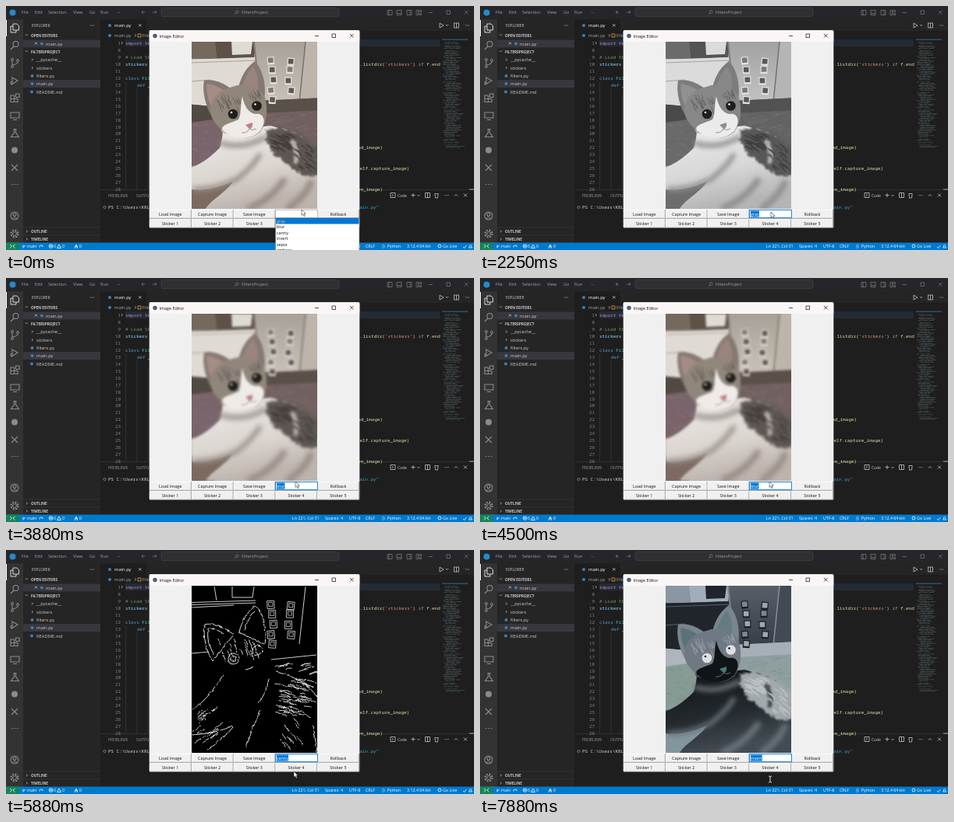
Recreate the animation shown at these times as an HTML page. Size 600 px wide and 314 px high, loop 8 s.

```html
<!DOCTYPE html>
<html lang="en">
<head>
<meta charset="utf-8">
<title>Image filter demo</title>
<style>
html, body { margin: 0; width: 100%; height: 100%; overflow: hidden; background: #1e1e1e; }
svg { display: block; width: 100vw; height: 100vh; }
text { font: 5.8px "Open Sans", sans-serif; fill: #ccc; white-space: pre; }
.menu { font-size: 5.6px; fill: #a2a2a2; }
.caps { font-size: 4.9px; }
.head { font-size: 4.7px; font-weight: 700; }
.code { font: 5.9px "Noto Sans Mono", monospace; fill: #d4d4d4; }
.num { fill: #858585; text-anchor: end; }
.right { text-anchor: end; }
.status { font-size: 5.3px; fill: #fff; }
.tk { font-size: 5.4px; fill: #111; }
.mid { text-anchor: middle; }
.line { fill: none; stroke: #c5c5c5; stroke-width: .8; }
.dim { stroke: #8b8b8b; stroke-width: 1.1; }
.faint { stroke: #777; }

#photo, #edges, #list, #mark, #field, .sel, #cursor, #arrow, #beam { animation: 8s step-end infinite; }
#photo { animation-name: filter; }
#edges { animation-name: edges; }
#list { animation-name: open; }
.sel { animation-name: selected; }
#mark { animation-name: hover; }
#field { animation-name: value; }
#arrow { animation-name: arrow; }
#beam { animation-name: beam; }
#cursor { animation-name: move; animation-timing-function: ease-in-out; }

@keyframes filter {
  0% { filter: none; }
  9.375% { filter: grayscale(1); }
  42.25% { filter: blur(1.6px); }
  73.5% { filter: none; }
  95.375%, 100% { filter: invert(1); }
}
@keyframes edges { 0% { opacity: 0; } 73.5% { opacity: 1; } 95.375%, 100% { opacity: 0; } }
@keyframes open {
  0%, 31.25%, 59.375%, 84.375% { opacity: 1; }
  9.375%, 42.25%, 73.5%, 95.375%, 100% { opacity: 0; }
}
@keyframes selected {
  0%, 31.25%, 59.375%, 84.375% { opacity: 0; }
  9.375%, 42.25%, 73.5%, 95.375%, 100% { opacity: 1; }
}
@keyframes hover {
  0%, 31.25%, 61%, 86% { transform: none; }
  37.5%, 59.375%, 66%, 88% { transform: translateY(7.5px); }
  68%, 84.375%, 90% { transform: translateY(15px); }
  92%, 100% { transform: translateY(22.5px); }
}
@keyframes value {
  0% { transform: none; }
  9.375% { transform: translateY(-20px); }
  42.25% { transform: translateY(-40px); }
  73.5% { transform: translateY(-60px); }
  95.375%, 100% { transform: translateY(-80px); }
}
@keyframes arrow { 0% { opacity: 1; } 95.375%, 100% { opacity: 0; } }
@keyframes beam { 0% { opacity: 0; } 95.375%, 100% { opacity: 1; } }
@keyframes move {
  0% { transform: translate(379px, 262px); }
  8%, 13% { transform: translate(376px, 277px); }
  20.5%, 31.5% { transform: translate(373px, 265px); }
  38%, 42% { transform: translate(372px, 287px); }
  48%, 59.5% { transform: translate(371px, 262px); }
  64% { transform: translate(371px, 278px); }
  69% { transform: translate(370px, 290px); }
  73.5% { transform: translate(369px, 285px); }
  81%, 84.5% { transform: translate(371px, 264px); }
  93%, 95.4% { transform: translate(372px, 298px); }
  98%, 100% { transform: translate(372px, 295px); }
}
</style>
</head>
<body>
<svg viewBox="0 0 600 314" preserveAspectRatio="none">
<defs>
  <clipPath id="frame"><rect x="238" y="46" width="161" height="215"/></clipPath>
  <clipPath id="box"><rect x="346" y="263" width="53" height="9"/></clipPath>
  <filter id="soft"><feGaussianBlur stdDeviation=".6"/></filter>
  <filter id="softer" x="-40%" y="-40%" width="180%" height="180%"><feGaussianBlur stdDeviation="3"/></filter>
  <filter id="fuzzy" x="-20%" y="-20%" width="140%" height="140%"><feTurbulence baseFrequency=".2" numOctaves="2" seed="2"/><feDisplacementMap in="SourceGraphic" scale="7" xChannelSelector="R" yChannelSelector="G"/><feGaussianBlur stdDeviation=".8"/></filter>
  <filter id="jag"><feTurbulence baseFrequency=".16" numOctaves="2" seed="4"/><feDisplacementMap in="SourceGraphic" scale="3" xChannelSelector="R" yChannelSelector="G"/></filter>
  <linearGradient id="door" x2="0" y2="1"><stop stop-color="#a59e94"/><stop offset="1" stop-color="#cac3ba"/></linearGradient>
  <linearGradient id="fur" x2=".3" y2="1"><stop stop-color="#efedea"/><stop offset=".6" stop-color="#dcd6d1"/><stop offset="1" stop-color="#bdb4ad"/></linearGradient>
  <path id="body" d="M278 163C300 172 328 148 346 156C374 160 396 176 399 190V261H256C262 250 282 240 291 226C270 235 250 238 238 236V208C252 202 266 192 276 180Z"/>
  <path id="patch" d="M332 158C352 150 382 160 399 184V214C386 222 370 214 362 203C349 197 338 186 332 172Z"/>
  <path id="skull" d="M262 135C262 118 275 107 290 104C305 98 325 103 332 118C336 132 335 150 326 162C314 173 292 172 278 160C268 152 263 145 262 135Z"/>
  <path id="earL" d="M254 96C251 110 256 130 264 142L291 108C278 98 265 93 254 96Z"/>
  <path id="earR" d="M319 71C308 79 301 91 298 105L331 121C334 100 329 81 319 71Z"/>
  <path id="muzzle" d="M303 116C305 128 311 138 320 139C330 137 335 148 326 161C314 173 291 173 278 160C274 153 288 151 298 146C302 139 300 129 303 116Z"/>
</defs>

<rect width="600" height="314" fill="#1e1e1e"/>
<rect width="600" height="17" fill="#242629"/>
<rect y="17" width="22" height="288" fill="#333"/>
<rect x="22" y="17" width="99" height="288" fill="#252526"/>
<path d="M22 43.500h99v10h-99zM22 95h99v10h-99z" fill="#37373d"/>
<rect x="121" y="17" width="479" height="15" fill="#252526"/>
<rect x="121" y="17" width="59" height="15" fill="#1e1e1e"/>
<rect x="199" y="2.500" width="228" height="11" rx="2.500" fill="#2d2f31" stroke="#47484b" stroke-width=".6"/>
<rect x="153" y="43" width="403" height="9" fill="#222b34"/>
<path d="M121 236.500H600M22 285H121M22 295H121M153.500 97.500V236M168 106.500V236M182.500 115V236" stroke="#3a3a3c" stroke-width=".7"/>
<path d="M594 236h6" stroke="#aaa"/>
<rect y="304.500" width="600" height="9.500" fill="#007acc"/>
<rect y="304.500" width="17" height="9.500" fill="#16825d"/>
<circle cx="8.500" cy="8.500" r="4" fill="#2489ca"/>

<path class="line faint" d="M178 8h-4l2-2m-2 2l2 2M188 8h5l-2-2m2 2l-2 2M298 7.500a1.800 1.800 0 1 0-3.600 0a1.800 1.800 0 1 0 3.600 0M295 9l-2 2M489 5.500h6v6h-6zM491 5.500v6M501 5.500h6v6h-6zM501 9.500h6M514 5.500h6v6h-6zM518 5.500v6M526 5.500h2.500v6H526zM530 5.500h2.500v2H530zM530 9.500h2.500v2H530zM542 8.500h5M565 6h4.500v4.500H565zM588 6l4.500 4.500m0-4.500l-4.500 4.500"/>
<path class="line" d="M556 22l5 3-5 3zM564 24l1.500 1.500 1.500-1.500M574.500 22h6v6h-6zM577.500 22v6M589 25h1m1 0h1m1 0h1M108 25h1m1 0h1m1 0h1M170 23l3.500 3.500m0-3.500l-3.500 3.500M37 46.500l3 3m0-3l-3 3"/>
<path class="line" d="M25 36.500l1.500 1.500 1.500-1.500M25 57.500l1.500 1.500 1.500-1.500M33 67.500l1.500 1.500-1.500 1.500M33 78l1.500 1.500-1.500 1.500M26 288.500l1.500 1.500-1.500 1.500M26 298.500l1.500 1.500-1.500 1.500M148 46l1.500 1.500-1.500 1.500M165 36.500l1.500 1.500-1.500 1.500"/>
<path class="line" d="M493 240.500h6v6h-6zM495 242l1.500 1.500-1.500 1.500M519.500 243.500h5M522 241v5M527.500 243l1.500 1.500 1.500-1.500M537.500 240.500h6v6h-6zM540.500 240.500v6M549.500 241.500h5M550 242l.5 5h3l.5-5M562.500 243.500h1m1 0h1m1 0h1M575 244.500l2-2 2 2M587 241.500l4 4m0-4l-4 4"/>
<rect y="18" width="1" height="21" fill="#fff"/>
<path class="line" d="M9 23h5l2.500 2.500V31H9zM9 26H6v8h7v-3" style="stroke:#fff"/>
<path class="line dim" d="M16 49a3.500 3.500 0 1 0-7 0a3.500 3.500 0 1 0 7 0M10 52l-4 4M8 70v7M15 71v1q0 3-7 4M8 92l7 4-7 4.500zM8 97a2 2 0 1 0 0 4M6 115h4.500v4.500H6zM6 119.500h4.500v4H6zM10.500 119.500H15v4h-4.500zM12.500 113H17v4.500h-4.500zM6 137h11v7H6zM9 146.500h5M9.500 158.500h4M10.500 159v4l-4 5.500h10l-4-5.500v-4M7 204l8 8M15 204l-8 8M7 229.500h1.500m2 0h1.500m2 0h1.500M16 270a5 5 0 1 0-10 0a5 5 0 1 0 10 0M13 268.500a2 2 0 1 0-4 0a2 2 0 1 0 4 0M8 274q3-3 6 0"/>
<g fill="none" stroke="#8b8b8b"><circle cx="8" cy="69" r="1.500"/><circle cx="8" cy="78" r="1.500"/><circle cx="15" cy="70" r="1.500"/><circle cx="11" cy="293" r="4.500" stroke-width="2" stroke-dasharray="2 1.530"/><circle cx="11" cy="293" r="2.500"/></g>
<circle cx="11" cy="185.500" r="4" fill="#8b8b8b"/>
<g fill="#3f7fb2"><circle cx="46" cy="48.500" r="2"/><circle cx="33.500" cy="90" r="2"/><circle cx="33.500" cy="100" r="2"/><circle cx="33" cy="110.500" r="2"/><circle cx="133" cy="25" r="2"/><circle cx="133" cy="38" r="2"/></g>
<path d="M169 36h4v4h-4z" fill="none" stroke="#ee9d28" stroke-width=".8"/>
<g fill="none" stroke="#fff" stroke-width=".8">
  <path d="M5 307l2.500 2-2.500 2.500M11.500 307l-2.500 2 2.500 2.500M22 307.500v4M24.500 308q0 2-2.500 2M43 310.500a2 2 0 0 1 4-1M47 308.500v1.500M56.500 308l2 2m0-2l-2 2M68 307l2.500 4.500h-5zM88 312l2-4.500 2 4.500M586 310l1.500 1.500 3-3.500M593.500 311h4q-1-1-1-2.500a1 1 0 0 0-2 0q0 1.500-1 2.500"/>
  <circle cx="57.500" cy="309" r="2.300"/><circle cx="90" cy="309" r="1"/><circle cx="556" cy="309" r="2"/>
</g>
<g id="minimap"></g>
<g id="ide"></g>

<rect x="183.700" y="31.200" width="269.600" height="254.300" rx="1.500" fill="#f0f0f0"/>
<rect x="183.700" y="31.200" width="269.600" height="14.800" rx="1.500" fill="#fbf6f6"/>
<circle cx="191" cy="38.500" r="2.700" fill="#46607c"/>
<path d="M396 38.500h5M418 36h4.500v4.500H418zM441 36l4.500 4.500m0-4.500l-4.500 4.500" fill="none" stroke="#222" stroke-width=".8"/>

<g clip-path="url(#frame)">
  <g id="photo">
    <rect x="230" y="40" width="177" height="230" fill="#bdb4aa"/>
    <g filter="url(#soft)">
      <path d="M230 40H267L270 68H230Z" fill="#75695c"/>
      <path d="M267 40H322L318 66 270 68Z" fill="#5e5248"/>
      <path d="M289 46H316L314 62 290 63Z" fill="#dedbd5"/>
      <path d="M230 69L320 66 326 134H230Z" fill="#dfdbd4"/>
      <path d="M238 73L320 70M238 97L262 95" stroke="#a8a097"/>
      <path d="M318 40H385L377 124 324 128Z" fill="url(#door)"/>
      <path d="M384 46L376 124" stroke="#7a7169" stroke-width="1.500"/>
      <path d="M318 46L326 124" stroke="#84796f" stroke-width="2"/>
      <path d="M325 122L407 118V200L325 190Z" fill="#70605f"/>
      <path d="M325 122L407 118V134L325 138Z" fill="#5a504a"/>
      <path d="M230 126L264 129 278 165 270 200 230 208Z" fill="#78646a"/>
      <path d="M230 126L264 129 266 146 230 151Z" fill="#524943"/>
      <path d="M230 230L294 222 262 270H230Z" fill="#7c6a60"/>
      <g id="rug"></g><g id="notes"></g>
      <use href="#body" fill="url(#fur)"/>
      <g fill="none" filter="url(#softer)">
        <path d="M274 176Q304 186 334 168M292 226Q318 206 326 190M240 236Q272 236 292 224" stroke="#968c86" stroke-width="6"/>
        <path d="M310 261Q340 249 358 222M392 224Q384 246 360 261" stroke="#968b84" stroke-width="8"/>
      </g>
      <g filter="url(#fuzzy)"><use href="#patch" fill="#5d5652"/>
        <path d="M364 172Q374 184 368 202" fill="none" stroke="#b9b1aa" stroke-width="5"/></g>
      <g id="tabby" fill="none" stroke="#38332f" stroke-width="1.100" opacity=".7"></g>
      <use href="#earL" fill="#857a71"/><use href="#earR" fill="#857a71"/>
      <path d="M257 100Q257 121 266 134L281 110Q269 101 257 100Z" fill="#a58c84"/>
      <path d="M317 78Q307 88 303 103L322 111Q326 92 317 78Z" fill="#9b847d"/>
      <use href="#skull" fill="#90867c"/>
      <g id="brow" fill="none" stroke="#5c534c" stroke-width=".9" opacity=".75"></g>
      <use href="#muzzle" fill="#eeebe8"/>
      <g fill="#211e1b" stroke="#8b877b" stroke-width="1.300"><circle cx="291" cy="139" r="7"/><circle cx="321.500" cy="128.500" r="7"/></g>
      <g fill="#fff"><circle cx="289" cy="137" r="1.300"/><circle cx="319.500" cy="126.500" r="1.300"/></g>
      <path d="M307 153L316 150Q317 157 312 158Z" fill="#c07f82"/>
      <path d="M312 158Q309 164 302 163M312 158Q316 161 321 158" fill="none" stroke="#8c7b76" stroke-width=".8"/>
    </g>
  </g>
  <g id="edges">
    <rect x="238" y="46" width="161" height="215"/>
    <g fill="none" stroke="#fff" stroke-width=".85" filter="url(#jag)">
      <use href="#earL"/><use href="#earR"/>
      <circle cx="291" cy="139" r="7"/><circle cx="291" cy="139" r="3.500"/><circle cx="321.500" cy="128.500" r="6.500"/>
      <path d="M259 100Q257 121 266 134M278 107Q269 100 259 100M318 78Q309 87 305 103M278 160Q266 182 238 206M290 225Q270 235 238 237M336 165Q333 183 322 197M326 205Q314 228 307 253M290 227Q280 240 257 257M393 225L398 260M307 153L316 150M346 156Q378 162 399 188"/>
    </g>
    <path d="M238 67.500L320 65M238 70.500L320 68M267 47L270 65M290 47V61H316L318 47M384 47L376 121M238 133L260 131M340 141L398 135M238 74L292 71" fill="none" stroke="#fff" stroke-width=".8"/>
    <g id="noteEdges"></g>
    <g id="furEdges" fill="none" stroke="#fff" stroke-width=".8" filter="url(#jag)"></g>
  </g>
</g>

<g id="buttons"></g>
<rect x="345.500" y="262.500" width="54" height="10" fill="#fff" stroke="#a5a5a5" stroke-width=".7"/>
<rect class="sel" x="345.500" y="262.500" width="54" height="10" fill="none" stroke="#0078d7" stroke-width=".8"/>
<g clip-path="url(#box)"><g id="field"></g></g>
<g id="list">
  <rect x="345.500" y="272.500" width="107.500" height="45" fill="#fff" stroke="#666" stroke-width=".6"/>
  <rect id="mark" x="346" y="273" width="106.500" height="7.500" fill="#0078d7"/>
  <g id="options"></g>
</g>
<g id="cursor">
  <path id="arrow" d="M0 0V7.300L1.700 5.800 3 8.700 4.300 8.100 3 5.300H5.300Z" fill="#fff" stroke="#222" stroke-width=".55"/>
  <path id="beam" d="M-2-4Q0-4 0-3Q0-4 2-4M0-3V3M-2 4Q0 4 0 3Q0 4 2 4" fill="none" stroke="#eee" stroke-width=".9"/>
</g>
</svg>
<script>
const $ = id => document.getElementById(id);
function add(parent, tag, attrs, content = '') {
  const el = document.createElementNS('http://www.w3.org/2000/svg', tag);
  for (const key in attrs) el.setAttribute(key, attrs[key]);
  el.textContent = content;
  return $(parent).appendChild(el);
}
function label(parent, cls, x, y, content, fill) {
  const el = add(parent, 'text', { class: cls, x, y: y + 2 }, content);
  if (fill) el.style.fill = fill;
}
const labels = (cls, rows) => rows.forEach(row => label('ide', cls, ...row));

let seed = 7;
const rand = (lo = 0, hi = 1) => {
  seed = (seed * 16807) % 2147483647;
  return lo + (hi - lo) * seed / 2147483647;
};

labels('menu', [[20, 8, 'File'], [37, 8, 'Edit'], [54, 8, 'Selection'], [86, 8, 'View'],
  [107, 8, 'Go'], [121, 8, 'Run'], [142, 7, '…'], [302, 8, 'FiltersProject']]);
labels('caps', [[33, 25, 'EXPLORER'], [131, 244, 'PROBLEMS', '#999'], [167, 244, 'OUTPUT', '#999'], [502, 243.5, 'Code']]);
labels('head', [[32, 38, 'OPEN EDITORS'], [32, 59, 'FILTERSPROJECT'], [32, 290, 'OUTLINE'], [32, 300, 'TIMELINE']]);
labels('', [[51, 48.5, 'main.py'], [39, 69, '__pycache__'], [39, 79.5, 'stickers'], [39, 90, 'filters.py'],
  [39, 100, 'main.py'], [39, 110.5, 'README.md'], [139, 25, 'main.py', '#fff'], [139, 38, 'main.py', '#a9a9a9'], [175, 38, 'FilterApp', '#a9a9a9']]);
labels('status', [[27, 309, 'main'], [61, 309, '0'], [72, 309, '0'], [94, 309, '0'], [367, 309, 'Ln 221, Col 31'],
  [409, 309, 'Spaces: 4'], [440, 309, 'UTF-8'], [461, 309, 'CRLF'], [482, 309, '{}  Python'],
  [514, 309, '3.12.4 64-bit'], [560, 309, 'Go Live']]);

const lineY = n => 93 + (n - 12) * 8.93;
label('ide', 'code num', 147, 47.7, '1');
for (let n = 8; n <= 28; n++) label('ide', 'code num', 147, lineY(n), n);
labels('code', [[153, 47.7, 'import tk', '#c586c0'], [153, lineY(9), '# Load St', '#6a9955'], [153, lineY(10), 'stickers ', '#9cdcfe'],
  [153, lineY(12), 'class', '#569cd6'], [174.2, lineY(12), 'Fil', '#4ec9b0'], [168, lineY(13), 'def', '#569cd6'], [182, lineY(13), '_', '#dcdcaa'],
  [454, lineY(10), '.listdir(', '#dcdcaa'], [485.9, lineY(10), "'stickers'", '#ce9178'], [521.3, lineY(10), ')'],
  [528.4, lineY(10), 'if', '#c586c0'], [539, lineY(10), 'f.end', '#dcdcaa'], [131, 259, 'PS C:\\Users\\KRLM']]);
labels('code right', [[483, lineY(22), 'load_image)', '#dcdcaa'], [517, lineY(25), 'self.capture_image)', '#dcdcaa'],
  [483, lineY(28), 'save_image)', '#dcdcaa'], [478, 259, 'main.py"', '#3a9fd0']]);
add('ide', 'circle', { cx: 126.5, cy: 259, r: 1.6, fill: 'none', stroke: '#777' });

const inks = ['#5f87a0', '#6f8794', '#8a7f70', '#5f8a80', '#7d8a94'];
add('minimap', 'rect', { x: 559, y: 42.7, width: 33, height: .9, fill: '#3074a0' });
for (let y = 45; y < 182; y += 1.5) {
  if (rand() < .12) continue;
  let x = 560 + Math.floor(rand(0, 4)) * 1.6;
  for (let i = 0; i < 3; i++) {
    const width = rand(2, 8);
    add('minimap', 'rect', { x, y, width, height: .7, fill: inks[Math.floor(rand(0, 5))], opacity: .5 });
    x += width + 1;
  }
}

// Pictures pinned to the door, in two loose columns.
for (let i = 0; i < 9; i++) {
  const x = 336 + (i % 2) * 23 + rand(-2, 3), y = 66 + Math.floor(i / 2) * 12 + rand(-1, 3);
  const shape = { x, y, width: 9, height: 10, transform: `rotate(${rand(-6, 6)} ${x} ${y})` };
  add('notes', 'rect', { ...shape, fill: '#e6e1da' });
  add('notes', 'rect', { ...shape, x: x + 1.2, y: y + 1.2, width: 6.6, height: 6.5, fill: i % 3 ? '#5d5853' : '#85776c' });
  add('noteEdges', 'rect', { ...shape, fill: 'none', stroke: '#fff', 'stroke-width': .7 });
  add('noteEdges', 'rect', { ...shape, x: x + 2, y: y + 2, width: 5, height: 5, fill: 'none', stroke: '#fff', 'stroke-width': .6 });
}
function strands(parent, count, [x0, x1], [y0, y1], [dx, dy], attrs = {}) {
  for (let i = 0; i < count; i++) {
    const x = rand(x0, x1), y = rand(y0, y1), k = rand(.5, 1.2);
    add(parent, 'path', { d: `M${x} ${y}q${dx * k / 2} ${dy * k / 2 - 2} ${dx * k} ${dy * k}`, ...attrs });
  }
}
const weave = { fill: 'none', stroke: '#9a8083', 'stroke-width': .8, opacity: .4 };
strands('rug', 45, [334, 398], [138, 170], [8, -3], weave);
strands('rug', 25, [238, 266], [152, 200], [7, 3], weave);
strands('tabby', 40, [338, 362], [164, 184], [10, 5]);
strands('tabby', 24, [368, 390], [178, 208], [9, 7]);
strands('brow', 26, [270, 297], [113, 130], [4, 8]);
strands('brow', 14, [309, 325], [107, 117], [3, 7]);
strands('furEdges', 48, [344, 385], [165, 210], [14, 4]);
strands('furEdges', 16, [270, 320], [112, 130], [4, 11]);
strands('furEdges', 18, [238, 272], [205, 256], [12, -9]);
strands('furEdges', 12, [340, 390], [146, 160], [12, -3]);
strands('furEdges', 10, [350, 390], [215, 250], [7, 9]);

function button(col, row, name) {
  const x = 184 + col * 53.8, y = 262 + row * 12;
  add('buttons', 'path', { d: `M${x} ${y + 11.3}h53.4v-11.3`, fill: 'none', stroke: '#707070', 'stroke-width': .7 });
  add('buttons', 'path', { d: `M${x + .5} ${y + 10.8}v-10.4h52.5`, fill: 'none', stroke: '#fff', 'stroke-width': .7 });
  label('buttons', 'tk mid', x + 26.7, y + 5.7, name);
}
['Load Image', 'Capture Image', 'Save Image', '', 'Rollback'].forEach((name, i) => button(i, 0, name));
for (let i = 0; i < 5; i++) button(i, 1, 'Sticker ' + (i + 1));
label('buttons', 'tk', 196.5, 38.5, 'Image Editor');

const filters = ['gray', 'blur', 'canny', 'invert', 'sepia', 'emboss'];
const optionY = i => 276.8 + i * 7.5;
filters.forEach((name, i) => label('options', 'tk', 347, optionY(i), name));
// The highlighted option is drawn in white over the dark labels.
const steps = [...document.styleSheets[0].cssRules].find(rule => rule.name === 'hover');
filters.slice(0, 4).forEach((name, i) => {
  const frames = [...steps.cssRules].flatMap(rule => rule.keyText.split(',').map(key => ({
    offset: parseFloat(key) / 100,
    opacity: Math.round((parseFloat(rule.style.transform.split('(')[1]) || 0) / 7.5) === i ? 1 : 0,
    easing: 'step-end'
  }))).sort((a, b) => a.offset - b.offset);
  label('options', 'tk', 347, optionY(i), name, '#fff');
  $('options').lastChild.animate(frames, { duration: 8000, iterations: Infinity });
});

filters.slice(0, 4).forEach((name, i) => {
  const y = 267.5 + (i + 1) * 20;
  label('field', 'tk', 347, y, name);
  const width = $('field').lastChild.getComputedTextLength();
  add('field', 'rect', { class: 'sel', x: 346.8, y: y - 4, width: width + .4, height: 8, fill: '#0078d7' });
  label('field', 'tk sel', 347, y, name, '#fff');
});
</script>
</body>
</html>
```
